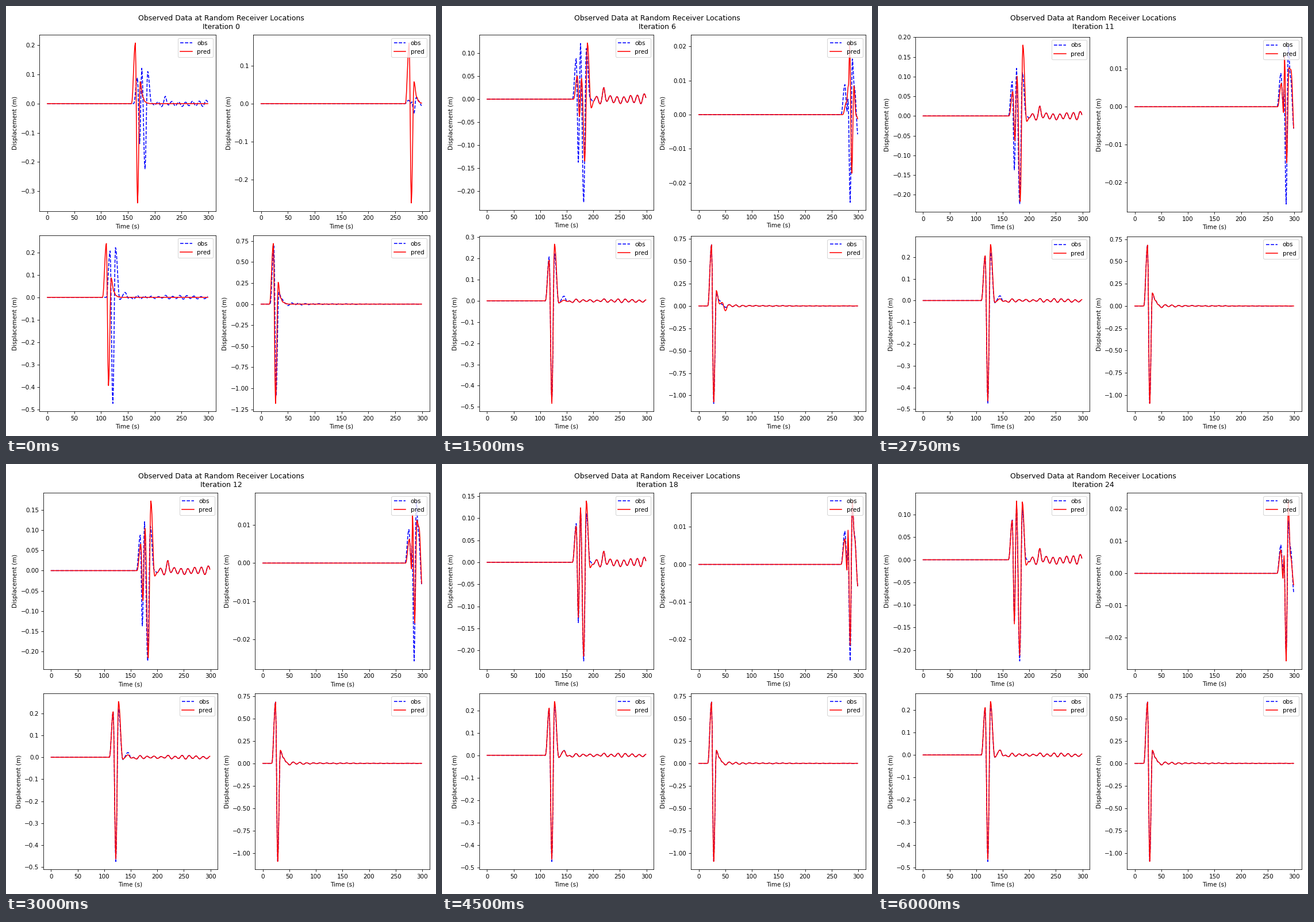
Animation, 748 px wide and 748 px high, one loop 6250 ms. Source, as a matplotlib script:

```python
import numpy as np
import matplotlib.pyplot as plt
from matplotlib.animation import FuncAnimation

T = np.arange(300)
STEPS = 25


def wave(t, v):
    """Cosine arcs through the extrema (t, v)."""
    v = np.asarray(v, float)
    s = np.interp(T, t, np.arange(len(t)))
    k = np.minimum(s.astype(int), len(t) - 2)
    return v[k] + (v[k + 1] - v[k]) * (1 - np.cos(np.pi * (s - k))) / 2


def pulse(t, v):
    """A wave that rises from rest and settles back to it."""
    return wave([t[0] - 7, *t, t[-1] + 5], [0, *v, 0])


def coda(seed, start, step, amp, fade=1e9):
    """Alternating ripples of random size after the main arrival."""
    rng = np.random.default_rng(seed)
    t = np.arange(start, 305, step)
    size = amp * rng.uniform(.35, 1, len(t)) * np.exp((start - t) / fade)
    size[::2] *= -1
    return wave([start - step, *t], [0, *size])


def bump(center, width):
    return np.exp(-((T - center) / width) ** 2)


def shot(arrival, amp, n):
    """Extrema of the smooth-model wavelet: three swings, then a decay."""
    k = np.arange(1, n - 2)
    t = arrival + np.array([0, 4, 9, *(9 + 4.5 * k)])
    v = amp * np.array([.61, -1, .22, *(.22 * .3 ** k)])
    return t, v


class Receiver:
    """Observed trace and a prediction that passes through a few states.

    states: (iteration, lag behind the observed extrema, values)
    """

    def __init__(self, t, obs, arrival, amp, states, tail=0 * T, rough=1, ease=1):
        t = np.array(t)
        self.obs = pulse(t, obs) + tail
        self.tail, self.rough, self.ease = tail, rough, ease
        t0, v0 = shot(arrival, amp, len(t))
        self.keys = [0] + [it for it, _, _ in states]
        self.times = np.array([t0] + [t + lag for _, lag, _ in states])
        self.values = np.array([v0] + [v for _, _, v in states])

    def pred(self, it):
        last = len(self.keys) - 2
        i = min(np.searchsorted(self.keys, it, "right") - 1, last)
        a, b = self.keys[i:i + 2]
        f = min((it - a) / (b - a), 1)
        # the first updates cover most of the way
        power = 5 if i == 0 else self.ease if i == last else 1
        f = 1 - (1 - f) ** power
        t, v = (r[i] + (r[i + 1] - r[i]) * f for r in (self.times, self.values))
        gain = np.interp(it, [0, 1, 3, 6], [0, self.rough, self.rough, 1])
        return pulse(np.round(t), v) + gain * self.tail


receivers = [
    Receiver(
        t=[168, 172, 176, 182, 187, 194],
        obs=[.088, -.137, .121, -.224, .110, .002],
        arrival=164, amp=.34, ease=2, rough=1.4,
        states=[(3, 2, [.043, -.023, .012, -.085, .087, -.020]),
                (11, 1, [.062, -.063, .101, -.217, .1803, -.013]),
                (24, 0, [.087, -.142, .130, -.212, .128, -.012])],
        tail=coda(3, 200, 6.4, .012) + .017 * bump(220, 2.5)),
    Receiver(
        t=[275, 279, 281, 285, 289, 293, 300],
        obs=[.0088, .001, .0045, -.0257, .0163, .008, -.0065],
        arrival=276, amp=.262,
        states=[(3, 5, [.002, .015, .0256, -.0186, .0072, -.0062, 0]),
                (11, 1, [.0062, -.0015, .0133, -.0148, .0103, .0098, -.0092]),
                (24, 0, [.0073, -.0015, .0055, -.0272, .0225, .0055, -.004])]),
    Receiver(
        t=[117, 122, 127, 135, 145, 151],
        obs=[.207, -.474, .222, -.010, .022, -.004],
        arrival=110, amp=.394, ease=3, rough=1.7,
        states=[(6, 0, [.191, -.484, .267, -.010, .003, -.003]),
                (11, 0, [.206, -.462, .258, -.008, .008, -.004]),
                (24, 0, [.211, -.464, .238, -.010, .022, -.004])],
        tail=coda(5, 161, 6.6, .009)),
    Receiver(
        t=[24, 28, 33, 39, 44, 50],
        obs=[.69, -1.09, .14, .06, .015, -.008],
        arrival=23, amp=1.18, rough=3,
        states=[(3, 0, [.68, -1.04, .21, -.035, .075, -.10]),
                (8, 0, [.683, -1.095, .146, .06, .015, -.01])],
        tail=coda(8, 51, 6.3, .016, fade=90)),
]

fig, axes = plt.subplots(2, 2, figsize=(10, 10), dpi=74.8)
title = fig.suptitle("")
preds = []
for ax, rec in zip(axes.flat, receivers):
    ax.plot(T, rec.obs, "b--", label="obs")
    preds += ax.plot(T, rec.pred(0), "r", label="pred")
    ax.set_xlabel("Time (s)")
    ax.set_ylabel("Displacement (m)")
    ax.legend(loc="upper right")


def update(it):
    title.set_text(f"Observed Data at Random Receiver Locations\nIteration {it}")
    for ax, rec, line in zip(axes.flat, receivers, preds):
        line.set_ydata(rec.pred(it))
        ax.relim()
        ax.autoscale_view()
    fig.tight_layout()
    return [title, *preds]


anim = FuncAnimation(fig, update, frames=STEPS, interval=250,
                     init_func=lambda: update(0), repeat=True, repeat_delay=0)
plt.show()
```
